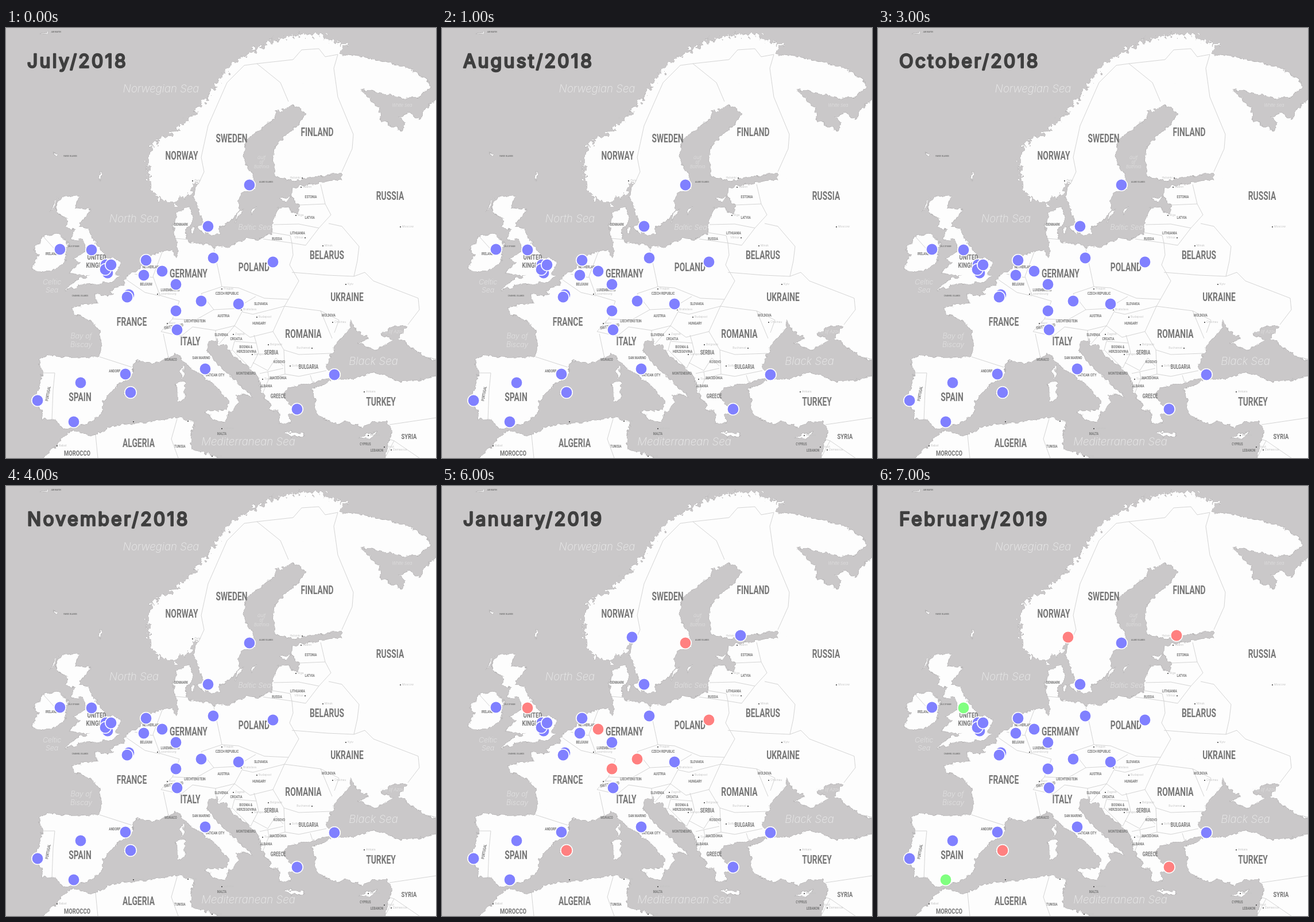
An HTML page for the animation above (8 s loop, 749 by 748 pixels).

```html
<!DOCTYPE html>
<html lang="en">
<head>
<meta charset="utf-8">
<title>Monthly map</title>
<style>
html, body { margin: 0; width: 100%; height: 100%; overflow: hidden; background: #cac8c9 }
svg { display: block }
#names { font-family: Roboto, sans-serif; font-weight: 700; fill: #777; text-anchor: middle }
#seas { font-family: Inter, sans-serif; font-style: italic; font-weight: 200; fill: #ebebeb; text-anchor: middle }
#cities { font: 5px Inter, sans-serif; fill: #c4c4c4 }
#cities circle { fill: #333 }
#title { font: 400 32px Inter, sans-serif; letter-spacing: 3.3px; fill: #3f3f3f; stroke: #3f3f3f; stroke-width: 2.6; stroke-linejoin: round }
#dots circle { stroke: #fff; stroke-width: 1.6 }
</style>
</head>
<body>
<svg width="749" height="748" viewBox="0 0 749 748">
<defs>
<filter id="rough" filterUnits="userSpaceOnUse" x="-20" y="-20" width="800" height="800" color-interpolation-filters="sRGB">
  <feTurbulence type="fractalNoise" baseFrequency=".12" numOctaves="2" seed="4"/>
  <feDisplacementMap in="SourceGraphic" scale="9" xChannelSelector="R" yChannelSelector="G"/>
</filter>
<filter id="fjords" filterUnits="userSpaceOnUse" x="-20" y="-20" width="800" height="800" color-interpolation-filters="sRGB">
  <feTurbulence type="fractalNoise" baseFrequency=".13" numOctaves="3" seed="7"/>
  <feDisplacementMap in="SourceGraphic" scale="24" xChannelSelector="R" yChannelSelector="G"/>
</filter>
<path id="norway" d="M331 266 322 287 288 306 262 293 250 270 248 246 249 222 260 198 292 182 320 158 350 122 372 92 390 66 410 52 432 38 468 22 500 13 533 10 566 20 592 32 580 44 580 115 530 118 440 162 345 275Z"/>
<g id="land">
  <!-- Sweden, Finland -->
  <path d="M350 160 540 100 530 150 520 146 500 131 480 131 466 145 468 157 440 178 418 194 412 225 432 262 432 278 413 286 404 300 406 318 396 331 371 348 372 357 354 361 341 330 328 296 333 270Z"/>
  <path d="M510 100 600 60 620 250 560 255 500 266 480 262 468 256 470 248 465 230 468 206 484 190 513 165 522 150Z"/>
  <!-- Russia, Black Sea -->
  <path d="M560 44 620 50 700 69 737 94 738 104 716 121 690 122 640 109 617 107 650 140 652 160 690 179 697 168 685 155 702 148 722 160 732 140 770 105 770 583 730 572 684 540 700 517 668 521 652 535 674 543 642 561 615 548 632 540 606 522 590 480 580 300 587 266 570 200Z"/>
  <!-- Baltic coast, Denmark -->
  <path d="M600 262 565 266 513 275 499 280 498 292 512 310 506 326 490 312 476 313 465 335 464 356 440 368 420 366 385 381 362 382 350 375 330 376 316 371 313 350 326 336 320 312 296 322 291 345 300 388 270 480 600 500Z"/>
  <!-- North Sea to Biscay -->
  <path d="M290 386 262 392 245 402 232 420 208 436 204 446 182 456 186 464 166 466 154 463 160 479 138 480 116 488 120 497 150 510 163 525 167 550 163 572 222 590 226 578 262 583 296 566 340 520Z"/>
  <!-- Iberia, Italy -->
  <path d="M163 572 110 574 72 570 58 577 64 600 52 650 62 664 63 680 86 681 100 697 148 686 170 664 168 650 195 620 222 600 222 578 190 560Z"/>
  <path d="M265 480 282 576 296 566 314 585 366 622 389 650 386 666 393 668 404 648 400 636 430 641 396 612 366 582 350 560 354 545 366 543 420 470Z"/>
  <!-- Balkans -->
  <path d="M360 490 370 552 382 550 396 568 440 606 444 632 462 655 462 665 476 667 478 688 496 686 491 673 504 668 482 640 490 626 534 617 572 606 557 590 566 566 578 545 598 522 605 470Z"/>
  <!-- Turkey, North Africa -->
  <path d="M770 600 720 613 685 614 640 599 605 611 572 612 533 628 540 650 536 660 552 680 580 690 592 683 618 694 640 685 664 684 672 700 653 770 770 770Z"/>
  <path d="M40 770 75 738 100 713 116 700 150 710 190 692 240 686 300 678 327 685 322 712 322 732 360 745 430 770Z"/>
  <!-- Great Britain, Ireland -->
  <path d="M100 294 128 292 119 312 146 316 126 345 142 349 150 366 168 388 172 400 192 402 200 408 190 428 198 432 185 442 135 446 104 455 128 436 145 431 112 425 130 408 118 400 138 390 136 368 113 367 121 350 105 346 108 334 90 322 90 304Z"/>
  <path d="M64 362 90 357 108 375 100 412 66 424 44 420 58 396 48 385 60 374Z"/>
  <!-- Islands -->
  <path d="M390 664 348 667 362 680 380 688ZM298 618 310 614 311 644 299 651ZM302 596 310 589 308 611ZM616 712 645 702 636 715ZM486 702 520 705 518 710 498 710ZM206 634 217 628 226 634 217 641Z"/>
  <path d="M333 346 350 340 347 358ZM320 349 329 348 326 358ZM426 318 436 309 428 325ZM411 318 401 338 404 322ZM478 297 494 293 487 303ZM161 258 166 249 164 265ZM78 320 89 294 86 308ZM59 12 74 6 70 9ZM84 217 92 218 90 222Z"/>
</g>
</defs>
<rect width="749" height="748" fill="#cac8c9"/>
<g fill="#fdfdfd">
  <g stroke="#b2b0b1" stroke-width="1.5">
    <use href="#norway" filter="url(#fjords)"/>
    <use href="#land" filter="url(#rough)"/>
  </g>
  <use href="#norway" filter="url(#fjords)"/>
  <use href="#land" filter="url(#rough)"/>
</g>
<g fill="none" stroke="#d0d0d0" stroke-width=".9" stroke-linejoin="round">
  <!-- Nordic -->
  <path d="M335 272 345 250 340 225 352 170 385 95 415 65 437 62 500 55 515 38 545 36 556 50 578 46 571 70 578 120 605 185 603 210 585 250M437 62 478 95 492 128"/>
  <!-- Baltic states, Poland -->
  <path d="M548 272 556 306 510 308M556 306 566 325 545 348 510 341 466 342M545 348 522 378 498 374 495 361 464 356M448 367 498 374 500 395 494 412 510 440 492 472 450 470 405 452 376 450 362 384"/>
  <!-- Western Europe -->
  <path d="M376 450 340 462 362 490 330 508 290 506 302 475 268 465 256 432 272 390M224 428 256 434M210 438 242 460 268 466M290 506 270 528 305 536 325 520 365 526 366 543M274 532 283 574M295 366 318 368"/>
  <!-- Danube -->
  <path d="M362 490 400 488 412 492 398 518 365 526M400 488 435 467M412 494 430 498 485 484 492 472M485 484 465 528 425 538 398 518 371 550M485 484 548 492 568 540M548 492 580 508 572 530M465 528 484 560 510 568 566 566"/>
  <!-- Balkans -->
  <path d="M484 560 486 602 510 606 558 596M530 604 534 616M486 602 458 610 456 598 483 592M442 601 456 598M458 610 446 638M394 560 398 545 436 548 440 565 426 592ZM436 548 432 534M430 582 456 596 470 574 483 588"/>
  <!-- Eastern Europe -->
  <path d="M498 425 560 430 606 432 612 405 615 380 585 345 562 340M606 432 625 425 640 440 718 470 720 490 700 516M730 572 749 576"/>
  <!-- Iberia, south -->
  <path d="M63 600 85 600 82 630 80 681M163 572 219 590M66 364 85 385 100 382M668 690 749 678M666 715 676 718 660 748M676 718 720 748M156 708 160 748M298 680 288 715 300 748"/>
</g>
<g id="cities"></g><g id="seas"></g><g id="names"></g><g id="dots"></g>
<text id="title" x="37" y="69"></text>
</svg>
<script>
const $ = id => document.getElementById(id);
const CONDENSED = .7;

// Each entry: text, centre x, centre y, optional turn
function labels(id, size, list, squeeze = 1) {
  $(id).innerHTML += list.trim().split(/\s*;\s*/).map(entry => {
    const [text, x, y, turn = 0] = entry.split(',');
    return `<text transform="translate(${x} ${y}) rotate(${turn}) scale(${squeeze} 1)"
      y="${size * .36}" font-size="${size}">${text}</text>`;
  }).join('');
}
const country = (size, list) => labels('names', size, list, CONDENSED);
const sea = (size, list) => labels('seas', size, list);

country(19.8, `NORWAY,306,222; SWEDEN,393,192; FINLAND,542,181; RUSSIA,669,292; BELARUS,559,395;
  UKRAINE,594,468; POLAND,432,416; GERMANY,318,427; FRANCE,219,511; SPAIN,129,642;
  ITALY,321,545; ROMANIA,518,532; TURKEY,653,650; ALGERIA,231,722`);
country(13.5, 'MOROCCO,124,739; SYRIA,702,710; UNITED,158,398; KINGDOM,161,412');
country(10.3, 'SERBIA,462,564; BULGARIA,527,589; GREECE,474,640');
country(7.2, `IRELAND,79,392; DENMARK,305,341; ESTONIA,531,293; LATVIA,529,329; LITHUANIA,508,356;
  RUSSIA,472,366; NETHERLANDS,255,415; BELGIUM,244,445; LUXEMBOURG,286,455; CZECH REPUBLIC,385,461;
  SLOVAKIA,444,479; AUSTRIA,379,500; HUNGARY,441,513; SWITZERLAND,292,519,-10; LIECHTENSTEIN,329,509;
  SLOVENIA,375,533; CROATIA,401,540; BOSNIA &amp,418,554; HERZEGOVINA,419,562`.replace('&amp', '&#38'.slice(0, 1)));
country(7.2, `KOSOVO,476,580; MONTENEGRO,418,600; MACEDONIA,474,608; ALBANIA,453,622; MOLDOVA,562,499;
  SAN MARINO,340,573; VATICAN CITY,364,603; MONACO,287,576; ANDORRA,191,596; PORTUGAL,73,636,-80;
  MALTA,376,705; TUNISIA,303,727; CYPRUS,626,723; LEBANON,646,734`);

sea(18.7, 'Norwegian Sea,270,105; North Sea,223,331; Black Sea,640,579; Mediterranean Sea,422,719');
sea(12.5, 'Baltic Sea,433,346; Celtic,80,441; Sea,80,455; Bay of,131,535; Biscay,131,550');
sea(7.5, 'Gulf,445,225; of,445,233; Bothnia,445,241; Sea of Azov,672,528; White Sea,690,134');

const cities = `Oslo,325,266; Helsinki,516,261; Tallinn,514,277; Riga,505,326; Vilnius,521,365; Minsk,552,379;
  Moscow,687,346; Prague,376,454; Luxembourg,264,463; Kyiv,592,446; Chisinau,569,512; Budapest,437,503;
  Bratislava,410,490; Zagreb,396,533; Bucharest,533,557; Belgrade,457,551; Sofia,495,588; Sarajevo,429,568;
  Tirana,447,611; Ankara,624,633; Algiers,222,685; Rabat,89,727; Tunis,317,684; Tripoli,359,745;
  Valletta,376,697; Nicosia,631,709; Damascus,671,734; Beirut,659,729; Bern,281,514`;
const LEFTWARD = ['Helsinki', 'Vilnius', 'Bucharest'];
$('cities').innerHTML = cities.split(/\s*;\s*/).map(entry => {
  const [name, x, y] = entry.split(',');
  const left = LEFTWARD.includes(name);
  return `<circle cx="${x}" cy="${y}" r="1"/>
    <text x="${+x + (left ? -3 : 3)}" y="${+y + 1}" text-anchor="${left ? 'end' : 'start'}">${name}</text>`;
}).join('');

const tiny = list => labels('names', 3.2, list);
tiny('JAN MAYEN,87,7; FAROE ISLANDS,112,223; ALAND ISLANDS,453,268; ISLE OF MAN,118,380; CHANNEL ISLANDS,129,466');

const BLUE = '#8080ff', RED = '#ff8080', GREEN = '#80ff80';
const spots = [
  [424, 273], [352, 345], [94, 385], [149, 386], [177, 426], [174, 412], [173, 420], [183, 412],
  [244, 404], [240, 430], [272, 423], [296, 446], [361, 400], [465, 407], [214, 464], [211, 468],
  [340, 475], [405, 480], [296, 492], [298, 525], [208, 602], [217, 634], [130, 617], [55, 648],
  [118, 685], [347, 593], [572, 603], [507, 663], [331, 263], [520, 260]
];
const LATE = 28; // spots from here on appear in January
const months = [
  { name: 'July/2018' },
  { name: 'August/2018' },
  { name: 'September/2018', green: [21] },
  { name: 'October/2018' },
  { name: 'November/2018' },
  { name: 'December/2018', red: [0, 3, 4, 11, 12, 17, 25, 27] },
  { name: 'January/2019', red: [0, 3, 10, 13, 16, 18, 21], late: true },
  { name: 'February/2019', red: [21, 27, 28, 29], green: [3, 24], late: true }
];

$('dots').innerHTML = spots.map(([x, y]) => `<circle cx="${x}" cy="${y}" r="10.2"/>`).join('');
const circles = [...$('dots').children];

let shown = -1;
function draw() {
  const step = Math.floor(performance.now() / 1000) % months.length;
  if (step !== shown) {
    shown = step;
    const { name, red = [], green = [], late } = months[step];
    $('title').textContent = name;
    circles.forEach((circle, i) => {
      circle.setAttribute('fill', red.includes(i) ? RED : green.includes(i) ? GREEN : BLUE);
      circle.setAttribute('visibility', i < LATE || late ? 'visible' : 'hidden');
    });
  }
  requestAnimationFrame(draw);
}
draw();
</script>
</body>
</html>
```
